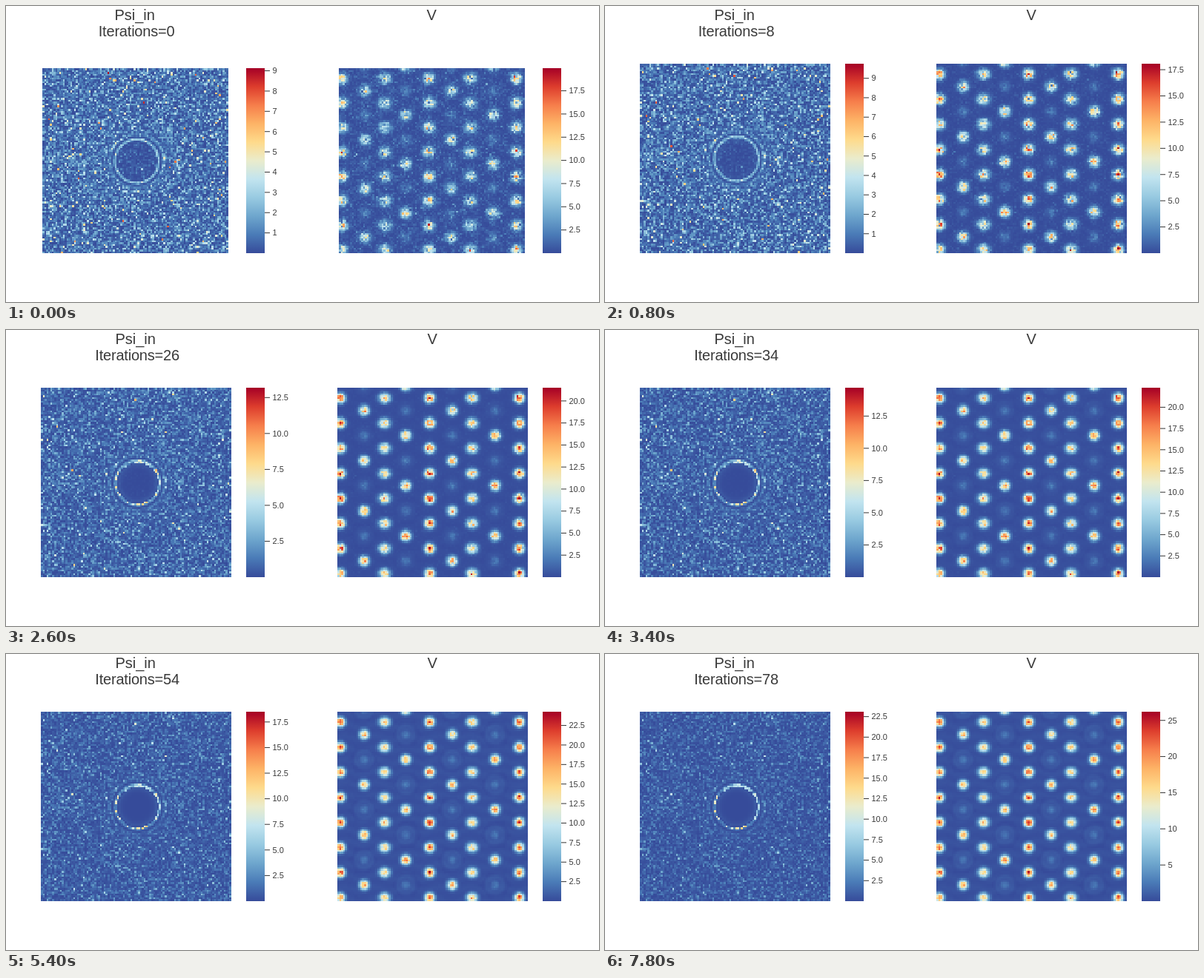
An HTML page with a canvas that plays this animation: 800 by 400 pixels, repeating every 8000 ms.

```html
<!DOCTYPE html>
<html lang="en">
<head>
<meta charset="utf-8">
<title>Psi_in and V</title>
<style>
html, body { margin: 0; width: 100%; height: 100%; overflow: hidden; background: #fff; }
canvas { position: absolute; image-rendering: pixelated; }
svg { position: absolute; left: 0; top: 0; }
text { font-family: "Liberation Sans", Arial, Helvetica, sans-serif; fill: #3a3a3a; }
.title { font-size: 20px; text-anchor: middle; }
.count { letter-spacing: -.2px; }
.tick { font-size: 11px; }
</style>
</head>
<body>
<canvas id="psi"></canvas>
<canvas id="pot"></canvas>
<svg id="svg" width="800" height="400" viewBox="0 0 800 400"></svg>
<script>
// N cells per side; geometry below is in units of 1/128 of the side
const N = 100, UNIT = 128 / N, STEP = 200, LOOP = 8000;
const SUNSET = ['364b9a', '4a7bb7', '6ea6cd', '98cae1', 'c2e4ef', 'eaeccc',
  'feda8b', 'fdb366', 'f67e4b', 'dd3d2d', 'a50026'];
const RGB = SUNSET.map(h => [0, 2, 4].map(i => parseInt(h.substr(i, 2), 16)));

// Colour-scale maxima at a few iteration counts
const KEYS = [0, 8, 18, 34, 54, 68, 78];
const PSI_MAX = [9.13, 9.75, 11.67, 14.7, 18.5, 21.13, 23.1];
const POT_MAX = [19.94, 18.07, 20.7, 22.3, 24.26, 25.7, 26.2];

const svg = document.getElementById('svg');
const clamp = (v, a = 0, b = 1) => Math.min(b, Math.max(a, v));
const mix = (a, b, t) => a + (b - a) * t;
const bell = (x, s) => Math.exp(-(x * x) / (s * s));

function along(values, it) {
  let i = 0;
  while (i < KEYS.length - 2 && it > KEYS[i + 1]) i++;
  return mix(values[i], values[i + 1], (it - KEYS[i]) / (KEYS[i + 1] - KEYS[i]));
}

function random(seed) {
  return () => {
    seed = (seed + 0x6d2b79f5) | 0;
    let t = Math.imul(seed ^ (seed >>> 15), 1 | seed);
    t = (t + Math.imul(t ^ (t >>> 7), 61 | t)) ^ t;
    return ((t ^ (t >>> 14)) >>> 0) / 4294967296;
  };
}

const rnd = random(2718);
const gauss = () => Math.sqrt(-2 * Math.log(1 - rnd())) * Math.cos(2 * Math.PI * rnd());

// Atom columns: x, strength, parity of the bright rows (-1: every row)
const COLUMNS = [
  [2, .8, -1], [18, .7, 1], [31.7, .6, -1], [46, .74, 0], [62, .84, -1],
  [77.2, .66, 1], [90.5, .6, -1], [106, .76, 0], [122.3, .8, -1]
];
const atoms = [];
for (const [x, amp, parity] of COLUMNS) {
  for (let k = 0; k < 8; k++) {
    const faint = parity >= 0 && k % 2 !== parity;
    atoms.push({
      x, y: (parity < 0 ? 7 : -1.6) + 16.95 * k, faint,
      amp: faint ? .09 : amp * (.93 + .14 * rnd()),
      wide: amp < .62 ? 1.15 : 1
    });
  }
}

const cells = Array.from({ length: N * N }, (_, i) => {
  const px = (i % N + .5) * UNIT, py = (Math.floor(i / N) + .5) * UNIT;
  const x = px - 65, y = py - 64.2;
  let atom, d2 = Infinity;
  for (const a of atoms) {
    const d = ((px - a.x) / a.wide) ** 2 + (py - a.y) ** 2;
    if (d < d2) { d2 = d; atom = a; }
  }
  return {
    x, y, r: Math.hypot(x, y), deg: Math.atan2(y, x) * 180 / Math.PI,
    wave: [gauss(), gauss(), gauss(), gauss()],
    dice: rnd(), jitter: gauss(), speck: -Math.log(1 - rnd()),
    px, py, atom, d: Math.sqrt(d2)
  };
});

// Diffraction envelope outside the central disc
function envelope({ x, y, r }) {
  const rings = 1 + 1.5 * Math.cos(2 * Math.PI * (r - 15) / 3.7) * Math.exp(-Math.max(0, r - 15) / 4);
  const far = bell(y, 3.5) * (bell(x - 27, 2.5) + .6 * bell(x + 27, 2.5) + .35 * bell(Math.abs(x) - 45, 5));
  const upright = .4 * bell(x, 4) * bell(Math.abs(y) - 28, 4);
  return Math.max(.15, rings) * (1 + far + upright + .15 * bell(y, 4));
}

// Bright rim around the disc, as a share of the scale
function rim({ r, deg, dice, jitter }, it) {
  const thin = r > 13.9 && r < 15.1;
  const rough = mix(.2, .05, clamp(it / 70));
  if (deg > -127 && deg < -46) {
    if (r < 13.4 || r > 15.2) return 0;
    if (deg > -52 && thin && dice > .4) return .9;
    return clamp(.36 + rough * jitter, .1, 1);
  }
  if (!thin) return 0;
  if (deg > -40 && deg < 38) return clamp(.34 + rough * jitter, .12, .7);
  if (deg > 60 && deg < 125) return dice > .5 ? .2 + .45 * dice : .08;
  if (deg > 145 || deg < -140) return dice > .5 ? .15 + .6 * dice : .1;
  return .12 * dice;
}

function psiAt(c, it, top) {
  const turn = .8 * (1 - Math.exp(-it / 18));
  const co = Math.cos(turn), si = Math.sin(turn), [a, b, d, e] = c.wave;
  const noise = ((a * co + d * si) ** 2 + (b * co + e * si) ** 2) / 2;
  const edge = rim(c, it) * clamp(it / 24);
  if (c.r < 13) {
    const calm = .3 * Math.exp(-it / 12) * noise / top;
    return calm + .07 * (c.r / 14) ** 8 * clamp(it / 12);
  }
  // Fringes close to the disc are steadier than the outer noise
  const steady = .7 * Math.exp(-Math.max(0, c.r - 16) / 3.5);
  return Math.max(mix(noise, 1.1, steady) * envelope(c) / top, edge);
}

function potAt(c, it) {
  const settle = Math.exp(-it / 24);
  const width = 3 + .45 * settle;
  const early = Math.exp(-it / 10);
  const peak = c.atom.amp * (c.atom.faint ? 1 : mix(1.02, .6, early));
  const rough = .06 + .34 * settle;
  const spot = peak * Math.exp(-((c.d / width) ** 2.3)) * Math.max(.15, 1 + rough * c.jitter);
  const grain = c.speck * (.016 * Math.exp(-it / 5) + .008 * Math.exp(-it / 22));
  const late = clamp((it - 12) / 40);
  const halo = c.atom.faint ? .022 * bell(c.d - 5.5, 1.5) : .008 * bell(c.d - 8, 2);
  const ripple = .005 * (1 + Math.sin(c.py * .8 + Math.sin(c.px * .3)));
  return spot + grain + late * (halo + ripple);
}

function colour(v, out, i) {
  const p = clamp(v) * 10, k = Math.min(9, Math.floor(p));
  for (let j = 0; j < 3; j++) out[i + j] = mix(RGB[k][j], RGB[k + 1][j], p - k);
  out[i + 3] = 255;
}

function heatmap(id, left, top, width, value) {
  const cv = document.getElementById(id), ctx = cv.getContext('2d');
  cv.width = cv.height = N;
  const img = ctx.createImageData(N, N);
  cells.forEach((c, i) => colour(value(c), img.data, i * 4));
  ctx.putImageData(img, 0, 0);
  cv.style.cssText = `left:${left}px;top:${top}px;width:${width}px;height:${334 - top}px`;
}

function colourbar(x, y, max) {
  const step = max > 25 ? 5 : max > 10 ? 2.5 : 1, h = 334 - y, right = x + 25;
  let s = `<rect x="${x}" y="${y}" width="25" height="${h}" fill="url(#scale)"/>`;
  for (let v = step; v <= max; v += step) {
    const ty = 334 - v / max * h;
    s += `<path d="M${right} ${ty}h7" stroke="#333"/>` +
      `<text class="tick" x="${right + 10.5}" y="${ty + 3.8}">${v.toFixed(step === 2.5 ? 1 : 0)}</text>`;
  }
  return s;
}

const title = (x, y, s, more = '') => `<text class="title ${more}" x="${x}" y="${y}">${s}</text>`;
const defs = '<defs><linearGradient id="scale" x1="0" y1="1" x2="0" y2="0">' +
  SUNSET.map((c, i) => `<stop offset="${i / 10}" stop-color="#${c}"/>`).join('') +
  '</linearGradient></defs>';

function draw(it) {
  const first = it === 0;
  const left = first ? 49 : 47, width = first ? 251 : 257, y = 335 - width;
  const mid = first ? 174.7 : 175.7;
  const psiMax = along(PSI_MAX, it), potMax = along(POT_MAX, it);
  heatmap('psi', left, y, width, c => psiAt(c, it, psiMax));
  heatmap('pot', left + 400, y, width, c => potAt(c, it));
  svg.innerHTML = defs +
    title(mid - 1, 19, 'Psi_in') + title(mid + 1.4, 41, 'Iterations=' + it, 'count') +
    title(mid + 399.5, 19, 'V') +
    colourbar(324, y, psiMax) + colourbar(724, y, potMax);
}

let shown = -1, start;
function tick(now) {
  if (start === undefined) start = now;
  const it = 2 * Math.floor((now - start) % LOOP / STEP);
  if (it !== shown) draw(shown = it);
  requestAnimationFrame(tick);
}
draw(shown = 0);
requestAnimationFrame(tick);
</script>
</body>
</html>
```
